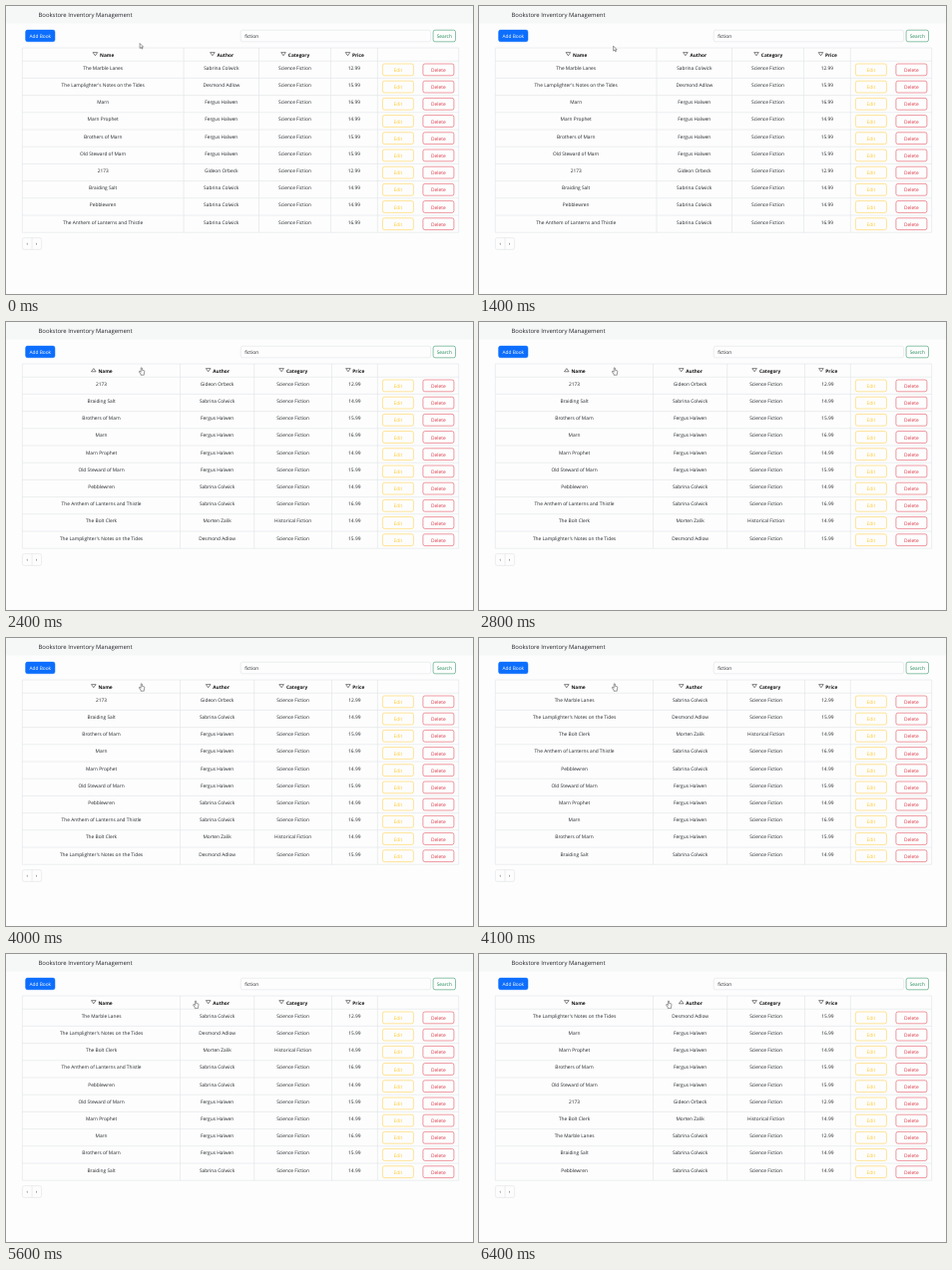
Recreate the animation shown at these times as an HTML page. Size 468 px wide and 289 px high, loop 8 s.

```html
<!DOCTYPE html>
<html lang="en">
<head>
<meta charset="utf-8">
<title>Bookstore Inventory Management</title>
<style>
  html, body { margin: 0; width: 100%; height: 100%; overflow: hidden; background: #fdfdfd; }
  svg { display: block; width: 100vw; height: 100vh; }
  text {
    font: 4.82px "Open Sans", "Noto Sans", sans-serif;
    fill: #212529;
    text-rendering: geometricPrecision;
    transform: rotate(.01deg); /* keeps baselines from snapping to whole pixels */
  }
  .mid { text-anchor: middle; }
  .head { font-weight: 700; font-size: 4.75px; fill: #111; }
  .title { font-size: 5.92px; }
  .line { fill: none; stroke: #e2e5e8; stroke-width: .65; }
  .icon { fill: none; stroke: #222; stroke-width: .55; stroke-linejoin: round; }
  .cursor { fill: #fff; stroke: #222; stroke-width: .45; stroke-linejoin: round; }
</style>
</head>
<body>
<svg id="stage" viewBox="0 0 468 289"></svg>
<script>
const LOOP = 8000;
const TOP = 55.2, ROW = 17.2, ROWS = 10;
const LEFT = 16.3, RIGHT = 453.7, HEAD = 42;
const UP = "M-2.3 1.6H2.3L0 -1.6Z";
const DOWN = "M-2.3 -1.6H2.3L0 1.6Z";

const HEADERS = [["Name", 7.8], ["Author", 8.9], ["Category", 11.5], ["Price", 6.4]];
const NARROW = { lines: [178, 253.5, 325.5, 372.3], centers: [97.2, 215.8, 289.5, 348.9] };
const WIDE = { lines: [174.5, 248.7, 326.5, 372.3], centers: [95.6, 211.6, 287.6, 349.3] };

const book = (name, author, price, category = "Science Fiction") =>
  ({ name, author, category, price });

const books = [
  book("The Marble Lanes", "Sabrina Colwick", "12.99"),
  book("The Lamplighter's Notes on the Tides", "Desmond Adlow", "15.99"),
  book("Marn", "Fergus Halwen", "16.99"),
  book("Marn Prophet", "Fergus Halwen", "14.99"),
  book("Brothers of Marn", "Fergus Halwen", "15.99"),
  book("Old Steward of Marn", "Fergus Halwen", "15.99"),
  book("2173", "Gideon Orbeck", "12.99"),
  book("Braiding Salt", "Sabrina Colwick", "14.99"),
  book("Pebblewren", "Sabrina Colwick", "14.99"),
  book("The Anthem of Lanterns and Thistle", "Sabrina Colwick", "16.99"),
  book("The Bolt Clerk", "Morten Zalik", "14.99", "Historical Fiction"),
];

const sortBy = key => [...books].sort((a, b) => (a[key] > b[key]) - (a[key] < b[key]));
const byName = sortBy("name");
const byNameDown = [...byName].reverse();
const byAuthor = sortBy("author");

const stage = document.getElementById("stage");

function add(tag, attrs, text) {
  const el = document.createElementNS("http://www.w3.org/2000/svg", tag);
  for (const k in attrs) el.setAttribute(k, attrs[k]);
  if (text) el.textContent = text;
  stage.append(el);
  return el;
}

const label = (x, y, text, cls = "mid", style = "") =>
  add("text", { x, y, class: cls, style }, text);

function button(x, y, w, h, text, color, solid) {
  add("rect", {
    x, y, width: w, height: h, rx: 1.9,
    fill: solid ? color : "none", stroke: color, "stroke-width": .5,
  });
  label(x + w / 2, y + h / 2 + 2, text, "mid", "fill:" + (solid ? "#fff" : color));
}

// Page chrome
add("rect", { width: 468, height: 17.5, fill: "#f6f7f7" });
label(32.5, 11.3, "Bookstore Inventory Management", "title");
button(19.6, 24.1, 29.4, 11.6, "Add Book", "#0d6efd", true);
add("rect", { x: 235.2, y: 24.2, width: 190.4, height: 11.6, rx: 1.9, class: "line" });
label(239.2, 31.9, "fiction", "");
button(428.1, 24.2, 22.4, 11.6, "Search", "#198754");
add("rect", { x: 16.4, y: 232.6, width: 19.2, height: 11.8, rx: 1.9, class: "line" });
add("path", { d: "M26 232.6v11.8", class: "line" });
label(21.2, 240.1, "‹");
label(30.6, 240.1, "›");

// Table
let rules = `M${LEFT} ${HEAD}H${RIGHT}`;
for (let i = 0; i <= ROWS; i++) rules += `M${LEFT} ${TOP + i * ROW}H${RIGHT}`;
const bottom = TOP + ROWS * ROW;
add("path", { d: `${rules}M${LEFT} ${HEAD}V${bottom}M${RIGHT} ${HEAD}V${bottom}`, class: "line" });
const columns = add("path", { class: "line" });

const heads = HEADERS.map(([text]) => ({
  icon: add("path", { class: "icon" }),
  text: label(0, 50.5, text, "mid head"),
}));

const cells = Array.from({ length: ROWS }, (_, i) => {
  const y = TOP + i * ROW;
  button(377.4, y + 2.8, 31, 11.8, "Edit", "#ffc932");
  button(417.9, y + 2.8, 31, 11.8, "Delete", "#dc3545");
  return HEADERS.map(() => label(0, y + 8.5, ""));
});

// Cursors, both drawn from their hot spot
const arrow = add("path", {
  class: "cursor", d: "M0 0V4.9L1.2 3.9L2 5.6L2.8 5.2L2 3.6H3.5Z",
});
const hand = add("path", {
  class: "cursor",
  d: "M-.6 .6Q0 -.4 .6 .6V2.8L2.5 3.2Q3.1 3.4 3 4.2L2.5 6.8V7.7H-.8V6.9" +
     "L-2.4 4.5Q-2.5 3.6 -1.6 3.9L-.6 4.8Z",
});

function showTable(layout, list, icons) {
  const { lines, centers } = layout;
  columns.setAttribute("d", lines.map(x => `M${x} ${HEAD}V${bottom}`).join(""));
  heads.forEach((h, c) => {
    h.icon.setAttribute("d", icons[c] ? UP : DOWN);
    h.icon.setAttribute("transform", `translate(${centers[c] - HEADERS[c][1]} 48.2)`);
    h.text.setAttribute("x", centers[c] + 4);
  });
  cells.forEach((row, r) => Object.values(list[r]).forEach((value, c) => {
    row[c].textContent = value;
    row[c].setAttribute("x", centers[c]);
  }));
}

// [start, layout, list, sorted column pointing up]
const scenes = [
  [0, NARROW, books, -1],
  [2200, NARROW, books, 0],
  [2400, WIDE, byName, 0],
  [4000, WIDE, byName, -1],
  [4100, WIDE, byNameDown, -1],
  [6400, WIDE, byAuthor, 1],
];

const progress = (t, from, steps) =>
  Math.min(1, Math.max(0, (Math.floor((t - from) / 100) + 1) / steps));

function moveCursor(t) {
  const a = progress(t, 1400, 3);
  const b = progress(t, 5200, 5);
  const ease = b * b * (3 - 2 * b);
  const x = 134.1 + 1.7 * a + 54.2 * ease;
  const y = 37.5 + 8 * a + 1.2 * ease;
  const pointing = y > HEAD;
  arrow.style.display = pointing ? "none" : "";
  hand.style.display = pointing ? "" : "none";
  (pointing ? hand : arrow).setAttribute("transform", `translate(${x} ${y})`);
}

let shown;
function draw(t) {
  const scene = scenes.findLast(s => t >= s[0]);
  if (scene !== shown) {
    const [, layout, list, up] = shown = scene;
    showTable(layout, list, HEADERS.map((_, c) => c === up));
  }
  moveCursor(t);
}

const start = performance.now();
function tick() {
  draw((performance.now() - start) % LOOP);
  requestAnimationFrame(tick);
}
tick();
</script>
</body>
</html>
```
